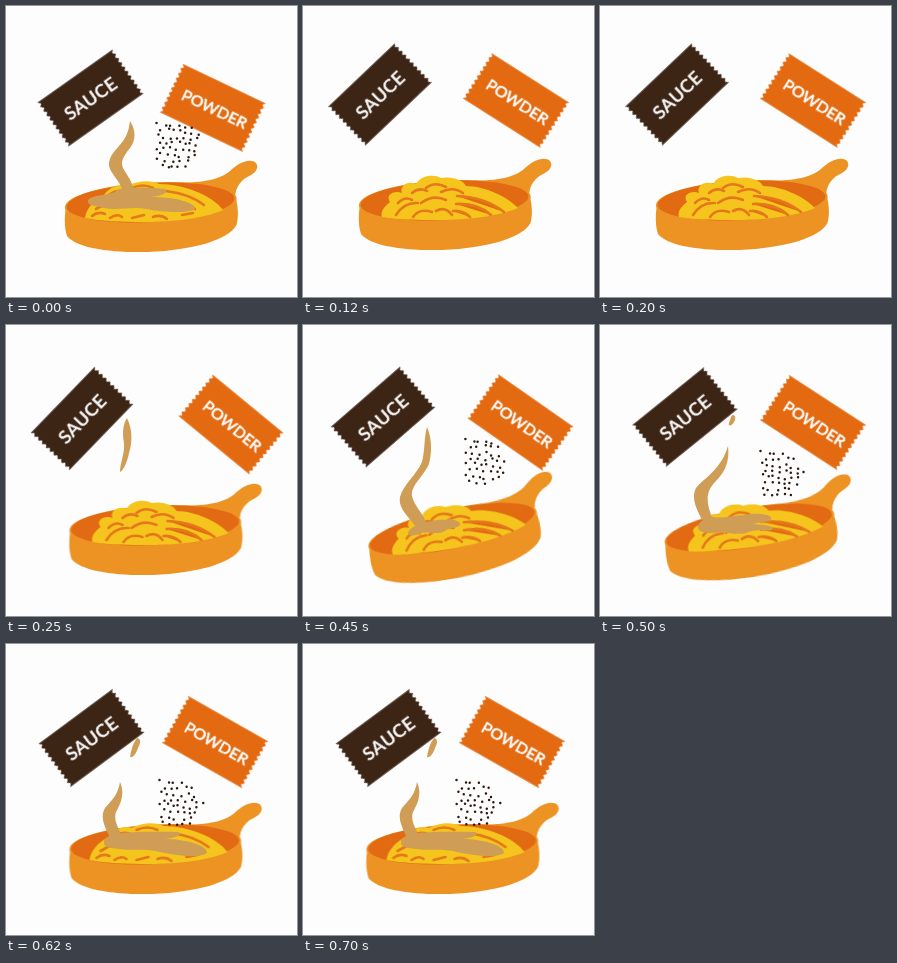
Animation of 291 by 291 pixels, one loop 750 ms. Source, as an HTML page:

```html
<!DOCTYPE html>
<html lang="en">
<head>
<meta charset="utf-8">
<title>Sauce and powder</title>
<style>
html, body { margin: 0; width: 100%; height: 100%; overflow: hidden; background: #fdfdfd; }
svg { display: block; width: 100vw; height: 100vh; }
text { font: 500 18px Lato, "Open Sans", sans-serif; fill: #fff; stroke: #fff; stroke-width: .5; text-anchor: middle; letter-spacing: .6px; }
#powder text { font-size: 16px; letter-spacing: 0; }
.body { fill: #ec9324; }
.inside { fill: #e26a12; }
.noodle { fill: #f5c51e; }
.gap { fill: none; stroke: #e4781a; stroke-width: 2.6; stroke-linecap: round; }
.sauce { fill: #cf9d56; }
.dots { fill: #2c1a12; }

#sauce, #powder, #pan, .step { animation: 750ms step-end infinite; }
#sauce { animation-name: sauce; }
#powder { animation-name: powder; }
#pan { animation-name: pan; transform-origin: 145px 205px; }
.step { visibility: hidden; }
#pour0 { animation-name: show0; }
#pour2 { animation-name: show2; }
#pour3 { animation-name: show3; }
#pour4 { animation-name: show4; }
#pour5 { animation-name: show5; }
#heap { animation-name: heap; }
#flat { animation-name: flat; }

@keyframes sauce {
  0% { transform: translate(84.5px, 92px) rotate(-35.2deg); }
  16% { transform: translate(77px, 88.5px) rotate(-43.6deg); }
  33.3333% { transform: translate(76px, 93.5px) rotate(-46deg); }
  49.3333% { transform: translate(80px, 92px) rotate(-41deg); }
  66.6667% { transform: translate(85px, 92px) rotate(-39deg); }
  82.6667%, 100% { transform: translate(85.5px, 94px) rotate(-36.5deg); }
}
@keyframes powder {
  0% { transform: translate(206.8px, 101.8px) rotate(25.5deg); }
  16% { transform: translate(213px, 94.5px) rotate(32.5deg); }
  33.3333% { transform: translate(225px, 99.5px) rotate(39.5deg); }
  49.3333% { transform: translate(217.5px, 97.5px) rotate(35deg); }
  66.6667% { transform: translate(213px, 97.5px) rotate(33deg); }
  82.6667%, 100% { transform: translate(209px, 98px) rotate(29.5deg); }
}
@keyframes pan {
  0% { transform: none; }
  16% { transform: translate(-3px, -2px); }
  33.3333% { transform: translate(4.5px, 4px); }
  49.3333% { transform: translate(6px, 7px) rotate(-9deg); }
  66.6667% { transform: translate(5.5px, 6px) rotate(-6.8deg); }
  82.6667%, 100% { transform: translate(4.5px, 4px); }
}
@keyframes show0 { 0% { visibility: visible; } 16%, 100% { visibility: hidden; } }
@keyframes show2 { 0% { visibility: hidden; } 33.3333% { visibility: visible; } 49.3333%, 100% { visibility: hidden; } }
@keyframes show3 { 0% { visibility: hidden; } 49.3333% { visibility: visible; } 66.6667%, 100% { visibility: hidden; } }
@keyframes show4 { 0% { visibility: hidden; } 66.6667% { visibility: visible; } 82.6667%, 100% { visibility: hidden; } }
@keyframes show5 { 0% { visibility: hidden; } 82.6667%, 100% { visibility: visible; } }
@keyframes heap { 0% { visibility: hidden; } 16% { visibility: visible; } 82.6667%, 100% { visibility: hidden; } }
@keyframes flat { 0% { visibility: visible; } 16% { visibility: hidden; } 82.6667%, 100% { visibility: visible; } }
</style>
</head>
<body>
<svg viewBox="0 0 291 291">
  <g id="pan">
    <path class="body" d="M175 177C203 176 217 172 225 164C233 157 241 153 248 155.500C254 159 251 166 245 169C236 173 229 180 229 193Z"/>
    <path class="body" d="M60 200C58.500 210 58 221 61 230C70 242 105 247 142 246C188 244 222 234 230.500 219C232.500 211 232.500 203 229.500 191Z"/>
    <ellipse class="body" cx="144.800" cy="197" rx="86" ry="20.500" transform="rotate(-3 145 197)"/>
    <ellipse class="inside" cx="144.500" cy="196.500" rx="84" ry="19.500" transform="rotate(-3 145 196.500)"/>
    <g id="heap" class="step">
      <path class="noodle" d="M82 213C80 207 85 202 90 198C85 191 94 186 102 189C99 182 108 176 116 180C121 171 134 170 141 174C153 172 163 176 166 182C185 182 208 193 218 204C200 212 168 216 140 216C118 216 98 216 82 213Z"/>
      <g class="gap">
        <path d="M98 199q7 -7 14 -3M112 189q7 -6 15 -2M126 184q9 -7 20 -1M141 188q12 -6 22 1"/>
        <path d="M96 211q8 -13 22 -12M113 213q6 -9 19 -5M121 199q12 -9 25 -3M136 207q9 -5 16 4"/>
        <path class="inside" d="M157 192q28 1 47 16M156 200q22 -1 35 11M153 207q10 -1 17 6"/>
      </g>
    </g>
    <g id="flat" class="step">
      <path class="noodle" d="M79 212C80 203 88 194 98 189C103 182 113 177 121 180C132 174 146 174 153 178C178 178 207 190 217 204C200 212 168 216 140 216C114 216 94 215 79 212Z"/>
      <g class="gap">
        <path d="M104 188q8 -5 16 -2M126 182q11 -5 21 0M90 203l9 -5M86 210q6 -5 13 -2M104 212q7 -5 12 -1M126 212l12 -3M147 211q8 -3 14 2"/>
        <path d="M160 185q24 3 38 14M166 194q14 2 23 9M176 209l11 -2"/>
      </g>
    </g>
  </g>

  <g id="sauce"><path fill="#3d2516"/><text y="6.500">SAUCE</text></g>
  <g id="powder"><path fill="#e36a10"/><text x="2" y="6">POWDER</text></g>

  <g id="pour0" class="step">
    <path class="sauce" d="M124 115C130 124 130 134 124 142C118 150 114 155 117 162C120 168 126 174 127 183L117 187C115 175 105 169 103 160C102 150 111 143 117 135C122 128 123 122 124 115Z"/>
    <path class="sauce" d="M82 195C83 188 107 190 111 184C125 180 149 182 159 183C164 187 154 190 145 191C166 191 190 196 189 203C181 208 156 206 140 203C125 200 112 205 98 202C88 200 81 199 82 195Z"/>
  </g>
  <g id="pour2" class="step">
    <path class="sauce" d="M121 93C126 103 127 116 123 128C121 138 117 146 114 147C114 138 119 128 118 118C116 108 117 99 121 93Z"/>
  </g>
  <g id="pour3" class="step">
    <path class="sauce" d="M124 102C129 113 129 127 126 139C121 151 107 161 109 171C111 181 121 189 123 198L112 201C104 190 95 183 97 172C100 160 114 149 119 137C122 125 121 112 124 102Z"/>
    <path class="sauce" d="M105 208C106 202 113 203 117 196C126 199 130 194 142 195C148 193 158 196 157 200C154 204 146 202 142 206C134 211 123 205 116 209C111 211 105 211 105 208Z"/>
  </g>
  <g id="pour4" class="step">
    <path class="sauce" d="M131 92C134 87 137 93 134 97C132 101 128 102 129 98Z"/>
    <path class="sauce" d="M128 121C130 138 124 148 116 156C106 166 105 176 113 195L103 197C96 183 91 173 96 163C104 153 121 145 128 121Z"/>
    <path class="sauce" d="M98 203C97 197 105 195 110 191C121 195 132 190 145 190C157 187 174 190 171 194C168 198 158 197 153 199C162 200 175 200 172 205C160 206 155 204 146 208C133 211 124 205 113 208C105 208 99 207 98 203Z"/>
  </g>
  <g id="pour5" class="step">
    <path class="sauce" d="M131 94C136 95 134 100 132 104C130 110 127 114 124 113C125 106 127 99 131 94Z"/>
    <path class="sauce" d="M114 138C119 150 115 159 110 168C107 176 113 185 116 192L104 194C98 181 94 173 99 164C107 155 112 150 114 138Z"/>
    <path class="sauce" d="M98 198C98 192 105 193 110 190C128 187 150 188 172 188C178 191 168 194 159 195C178 195 202 201 201 209C192 215 168 211 154 208C140 204 126 207 113 205C104 204 97 203 98 198Z"/>
  </g>
</svg>
<script>
// Packet outline with serrated short sides
function packet(w, h, teeth, depth) {
  const x = w / 2, y = h / 2, half = h / teeth / 2;
  let d = `M${-x} ${-y}H${x}`;
  for (let i = 0; i < teeth; i++) d += `l${-depth} ${half}l${depth} ${half}`;
  d += `H${-x}`;
  for (let i = 0; i < teeth; i++) d += `l${depth} ${-half}l${-depth} ${-half}`;
  return d + 'Z';
}
for (const id of ['sauce', 'powder'])
  document.querySelector(`#${id} path`).setAttribute('d', packet(92.5, 53.5, 10, 2.8));

// Sprinkled grains: staggered rows of the given widths, jittered
function sprinkle(id, x, y, widths) {
  let seed = 17, d = '';
  const rand = () => (seed = seed * 16807 % 2147483647) / 2147483647 - .5;
  const r = 1.25;
  widths.forEach((w, row) => {
    const count = Math.round(w / 6.4);
    for (let i = 0; i < count; i++) {
      const px = x + w * (i + .2 + row % 2 * .5) / count + rand() * 3.6;
      const py = y + row * 6 + i * .5 + rand() * 3.6;
      d += `M${px - r} ${py}a${r} ${r} 0 1 0 ${2 * r} 0a${r} ${r} 0 1 0 ${-2 * r} 0`;
    }
  });
  const path = document.createElementNS('http://www.w3.org/2000/svg', 'path');
  path.setAttribute('class', 'dots');
  path.setAttribute('d', d);
  document.getElementById(id).append(path);
}
sprinkle('pour0', 151, 118, [40, 44, 44, 42, 42, 38, 35, 30]);
sprinkle('pour3', 163, 115, [30, 34, 38, 41, 41, 39, 36, 20]);
sprinkle('pour4', 161, 127, [26, 35, 42, 46, 42, 38, 35, 30]);
sprinkle('pour5', 154, 137, [26, 34, 41, 46, 42, 38, 35, 30]);
</script>
</body>
</html>
```
